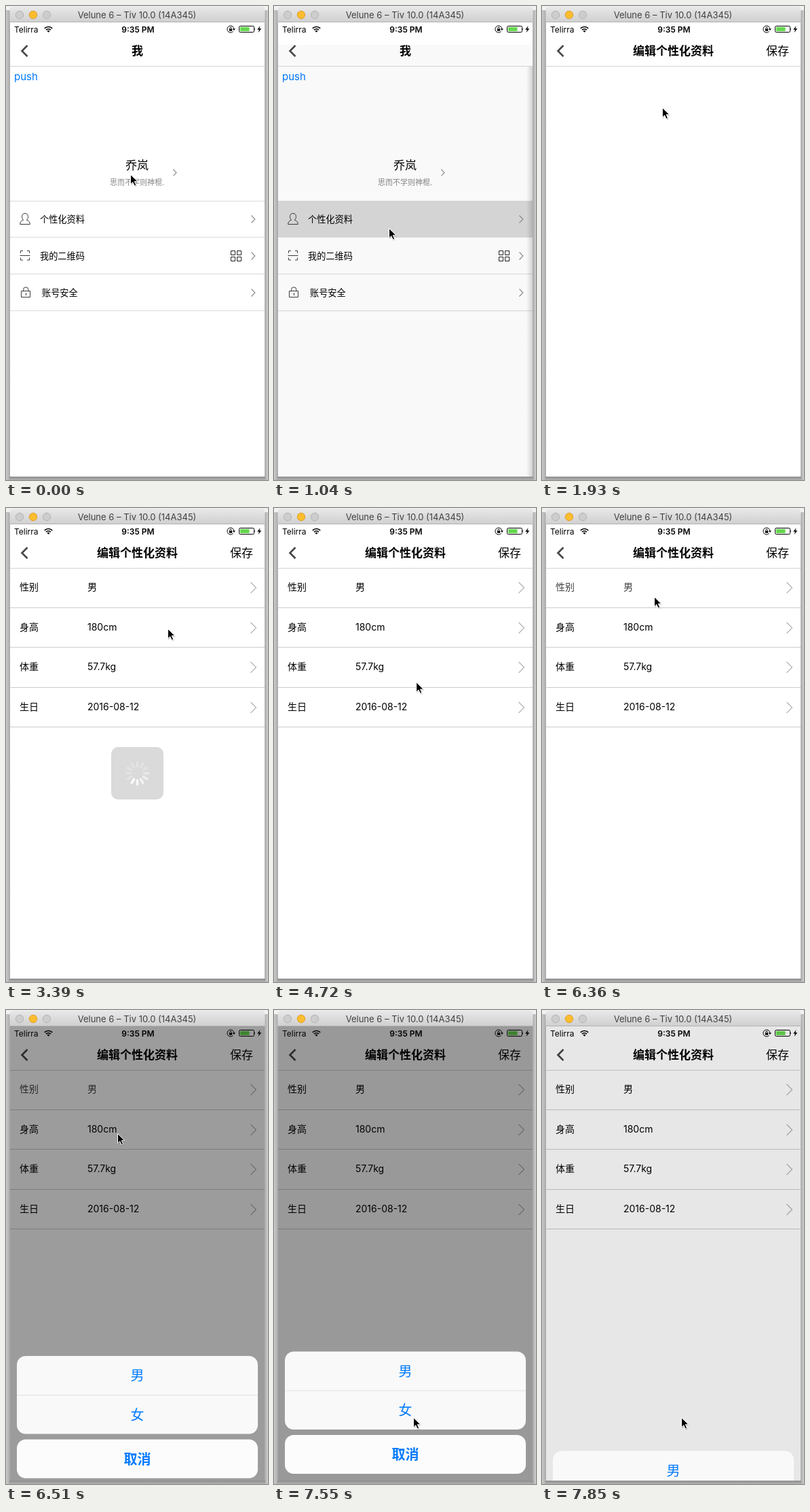
An HTML page that plays this animation: 386 px wide and 696 px high, repeating every 7990 ms.

```html
<!DOCTYPE html>
<html lang="zh-CN">
<head>
<meta charset="utf-8">
<title>个性化资料</title>
<style>
  html, body { margin: 0; width: 100%; height: 100%; overflow: hidden; background: #d4d4d4; }
  svg { display: block; width: 386px; height: 696px; }
  text { font-family: Inter, "Noto Sans CJK SC", "Noto Sans CJK", sans-serif; fill: #000; white-space: pre; }
  .mid { text-anchor: middle; }
  .bold { font-weight: 600; }
  .link { fill: #007aff; }
  .icon { fill: none; stroke: #3c3c3c; stroke-width: 1; }
  .chev { fill: none; stroke: #8a8a8a; stroke-width: 1.1; }
</style>
</head>
<body>
<svg viewBox="0 0 386 696" xmlns="http://www.w3.org/2000/svg">
  <defs>
    <linearGradient id="bar" x2="0" y2="1"><stop stop-color="#e9e8e9"/><stop offset="1" stop-color="#d0cfd0"/></linearGradient>
    <linearGradient id="left"><stop stop-color="#cbcbcb"/><stop offset="1" stop-color="#a8a8a8"/></linearGradient>
    <linearGradient id="right"><stop stop-color="#a8a8a8"/><stop offset="1" stop-color="#cfcfcf"/></linearGradient>
    <linearGradient id="foot" x2="0" y2="1"><stop stop-color="#8c8c8c"/><stop offset="1" stop-color="#b2b2b2"/></linearGradient>
    <linearGradient id="edge"><stop stop-opacity="0"/><stop offset="1" stop-opacity=".16"/></linearGradient>
    <clipPath id="screen"><path d="M6 24h375v667H6z"/></clipPath>
    <clipPath id="body"><path d="M6 89h375v602H6z"/></clipPath>
  </defs>

  <!-- desktop and window -->
  <path d="M0 0h386v7H0z" fill="#f1f1f1"/>
  <path d="M0 6.5h386" stroke="#c4c4c4"/>
  <path d="M0 7h6v689H0z" fill="url(#left)"/>
  <path d="M381 7h5v689h-5z" fill="url(#right)"/>
  <path d="M5 691h377v5H5z" fill="url(#foot)"/>
  <path d="M5.500 24V6a5 5 0 0 1 5-5h366a5 5 0 0 1 5 5v18z" fill="url(#bar)"/>
  <path d="M6 23.500h375" stroke="#b3b3b3"/>
  <g stroke-width="1">
    <circle cx="20" cy="13" r="5.700" fill="#cecdce" stroke="#b5b4b5"/>
    <circle cx="40" cy="13" r="5.700" fill="#fdbd2f" stroke="#dd9f2a"/>
    <circle cx="60" cy="13" r="5.700" fill="#cecdce" stroke="#b5b4b5"/>
  </g>
  <text class="mid" x="193" y="18" font-size="13" style="fill:#404040">Velune 6 – Tiv 10.0 (14A345)</text>

  <g clip-path="url(#screen)">
    <path d="M6 24h375v667H6z" fill="#fff"/>

    <g clip-path="url(#body)">
      <g id="home">
        <path d="M6 89h375v602H6z" fill="#fff"/>
        <path id="press" d="M6 287h375v53H6z" fill="#d9d9d9"/>
        <path d="M6 286.500h375M6 339.500h375M6 393.500h375M6 447.500h375" stroke="#dadada"/>
        <text class="link" x="12" y="108.500" font-size="15">push</text>
        <text class="mid" x="193" y="240" font-size="17">乔岚</text>
        <text x="153" y="263" font-size="11" style="fill:#888">思而不学则神棍.</text>
        <path class="chev" d="M246.500 240l4.500 4.700-4.500 4.700"/>
        <g font-size="13.200">
          <text x="50" y="317.500">个性化资料</text>
          <text x="50" y="371.500">我的二维码</text>
          <text x="53" y="425.500">账号安全</text>
        </g>
        <path class="chev" d="M361.500 307.500l5.300 5.500-5.300 5.500M361.500 361.500l5.300 5.500-5.300 5.500M361.500 415.500l5.300 5.500-5.300 5.500"/>
        <g class="icon">
          <path d="M28 304.500c-3 0-4.500 2-4.500 4.800 0 2.200 1 4 2.200 5-3 .8-5 2.800-5 6.200h14.600c0-3.400-2-5.400-5-6.200 1.200-1 2.200-2.800 2.200-5 0-2.800-1.500-4.800-4.500-4.800z"/>
          <path d="M21.500 363v-3.500H25M31 359.500h3.500V363M21.500 369.500v3.500H25M31 373h3.500v-3.500M20.500 366.500h15"/>
          <path d="M22.500 418.500h13v9h-13zM25.500 418v-1.500a3.700 3.700 0 0 1 7.400 0v1.500M29.500 421v4"/>
          <path d="M331.500 359.500h6v6h-6zM340.500 359.500h6v6h-6zM331.500 368.500h6v6h-6zM340.500 368.500h6v6h-6z" stroke="#222"/>
        </g>
      </g>
      <path id="shade" d="M6 89h375v602H6z"/>
      <g id="edit">
        <path d="M-3 89h9v602h-9z" fill="url(#edge)"/>
        <path d="M6 89h375v602H6z" fill="#fff"/>
        <g id="table"></g>
        <g id="hud">
          <rect x="155" y="351" width="77" height="77" rx="10" fill-opacity=".8"/>
          <g id="spin" stroke="#fff" stroke-width="3.200" stroke-linecap="round"></g>
        </g>
      </g>
    </g>

    <!-- navigation bar -->
    <path id="navShade" d="M6 57h375v31H6z"/>
    <path d="M6 88.500h375" stroke="#d3d3d3"/>
    <path d="M31.500 58l-8 8 8 8" fill="none" stroke="#484848" stroke-width="2.600"/>
    <text id="homeTitle" class="mid bold" x="193.500" y="72" font-size="17">我</text>
    <text id="editTitle" class="mid bold" x="193.500" y="72" font-size="17">编辑个性化资料</text>
    <text id="save" x="330" y="72" font-size="17">保存</text>

    <!-- status bar -->
    <text x="12" y="38.500" font-size="12">Telirra</text>
    <text class="mid bold" x="194.500" y="38.500" font-size="12">9:35 PM</text>
    <g fill="none" stroke="#000" stroke-width="1.700">
      <path d="M56.800 32.800a8.200 8.200 0 0 1 11.400 0M59 35.200a5 5 0 0 1 7 0"/>
      <path d="M62.500 38.800l-2-2a2.800 2.800 0 0 1 4 0z" fill="#000" stroke="none"/>
      <path d="M334.500 37.500a5 5 0 1 1 1.400-3.500" stroke-width="1"/>
      <path d="M333.800 33.500h4.200l-2.100 2.600z" fill="#000" stroke="none"/>
      <path d="M328.800 33.500h4.400v3.200h-4.400z" fill="#000" stroke="none"/>
      <path d="M329.700 33.500v-1a1.300 1.300 0 0 1 2.600 0v1" stroke-width=".9"/>
      <rect x="343.500" y="29.500" width="22" height="9" rx="1.800" stroke-width="1"/>
      <path d="M345 31h13.500v6H345z" fill="#65d84f" stroke="none"/>
      <path d="M366.500 32.300q1.600 1.700 0 3.400z" fill="#000" stroke="none"/>
      <path d="M374.500 29l-4.300 5.700h2.700l-1.300 4.300 4.700-5.800h-2.900z" fill="#000" stroke="none"/>
    </g>

    <path id="dim" d="M6 24h375v667H6z"/>
    <g id="sheet">
      <rect x="16" y="508" width="355" height="114.500" rx="13" fill="#f9f9f9"/>
      <rect x="16" y="630.500" width="355" height="57" rx="13" fill="#fcfcfc"/>
      <path d="M16 565.500h355" stroke="#e1e1e2"/>
      <g class="mid" font-size="20">
        <text class="link" x="193.500" y="544">男</text>
        <text class="link" x="193.500" y="601.500">女</text>
        <text class="link bold" x="193.500" y="666.500">取消</text>
      </g>
    </g>
  </g>

  <g id="cursor">
    <path d="M1 1.500v15l3.400-3.200 2.500 5.200 2.600-1.200-2.300-5h4.800z" opacity=".22"/>
    <path d="M.5.500v14.300l3.300-3.100 2.300 5.200 2.500-1.100-2.300-5.100h4.700z" stroke="#fff"/>
  </g>
</svg>

<script>
const LOOP = 7990;
const $ = id => document.getElementById(id);
const move = (id, x, y = 0) => $(id).setAttribute('transform', `translate(${x} ${y})`);
const fade = (id, v) => $(id).setAttribute('opacity', v);

// The picture is refreshed in bursts: first time, last time, number of steps.
const ticks = [
  [0, 0, 1], [150, 300, 2], [1040, 2070, 8], [2220, 3240, 8], [3390, 3980, 5],
  [4570, 5160, 5], [5610, 6510, 7], [6660, 7550, 7], [7850, 7850, 1]
].flatMap(([a, b, n]) => Array.from({ length: n }, (_, i) => a + (b - a) * i / Math.max(1, n - 1)));

// Tracks: time, then values.
const cursorPath = [
  [0, 183, 247], [150, 176, 288], [300, 169, 326], [1480, 169, 326], [1930, 177, 146],
  [2220, 188, 138], [2950, 238, 177], [3540, 238, 177], [3980, 231, 123], [4570, 226, 180],
  [5010, 176, 405], [5160, 170, 415], [5610, 169, 385], [6210, 166, 218], [6360, 165, 130],
  [6510, 164, 181], [6660, 166, 215], [7255, 198, 530], [7550, 205, 598]
];
const hudTrack = [[2070, 0], [2220, .4], [2365, 1], [3095, 1], [3240, .93], [3390, .18], [3535, 0]];
const sheetTrack = [[6360, 190, 0], [6510, 0, .39], [6660, -6.5, .4], [7550, -6.5, .4], [7850, 139.5, .095]];

function at(track, t) {
  const i = track.findIndex(k => k[0] > t);
  if (i === 0) return track[0].slice(1);
  if (i < 0) return track[track.length - 1].slice(1);
  const a = track[i - 1], b = track[i], u = (t - a[0]) / (b[0] - a[0]);
  return a.slice(1).map((v, j) => v + (b[j + 1] - v) * u);
}

const rows = [['性别', '男'], ['身高', '180cm'], ['体重', '57.7kg'], ['生日', '2016-08-12']];
$('table').innerHTML = rows.map(([name, value], i) => {
  const mid = Math.round(116.4 + i * 58.4), line = Math.floor(146 + i * 58.5) + .5;
  return `<g id="row${i}" font-size="14"><text x="20" y="${mid + 5}">${name}</text>
    <text x="120" y="${mid + 5}">${value}</text></g>
    <path d="M360.500 ${mid - 7}l8 8-8 8" fill="none" stroke="#b4b4b4" stroke-width="1.200"/>
    <path d="M6 ${line}h375" stroke="#cdcdcf"/>`;
}).join('');

$('spin').innerHTML = Array.from({ length: 12 }, (_, i) =>
  `<path d="M193.500 379.500v-6.500" transform="rotate(${i * 30} 193.500 389.500)"/>`).join('');
const spokes = [...$('spin').children];

function draw(time) {
  const t = ticks.filter(k => k <= time + .01).pop();

  const u = Math.min(1, Math.max(0, (t - 1040) / 450));
  const p = 1 - (1 - u) ** 3;
  const pushed = t >= 1040;
  fade('press', pushed ? 1 : 0);
  move('home', -112 * p);
  fade('shade', pushed ? .025 + .075 * p : 0);
  fade('navShade', pushed ? .025 * (1 - p) : 0);
  move('edit', 375 * (1 - p));
  fade('edit', pushed ? 1 : 0);
  move('homeTitle', -110 * p);
  fade('homeTitle', 1 - p);
  move('editTitle', 110 * (1 - p));
  fade('editTitle', p);
  fade('save', p);

  fade('table', t >= 3240 ? 1 : 0);
  fade('row0', t >= 6360 && t < 6660 ? .75 : 1);
  fade('hud', at(hudTrack, t)[0]);
  const head = Math.floor(t * .012) + 3;
  spokes.forEach((s, i) => {
    const lag = ((head - i) % 12 + 12) % 12;
    s.setAttribute('opacity', Math.max(.25, 1 - lag * .15));
  });

  const [drop, dark] = at(sheetTrack, t);
  move('sheet', 0, drop);
  fade('dim', dark);
  move('cursor', ...at(cursorPath, t));
}

const start = performance.now();
function frame() {
  draw((performance.now() - start) % LOOP);
  requestAnimationFrame(frame);
}
frame();
</script>
</body>
</html>
```
